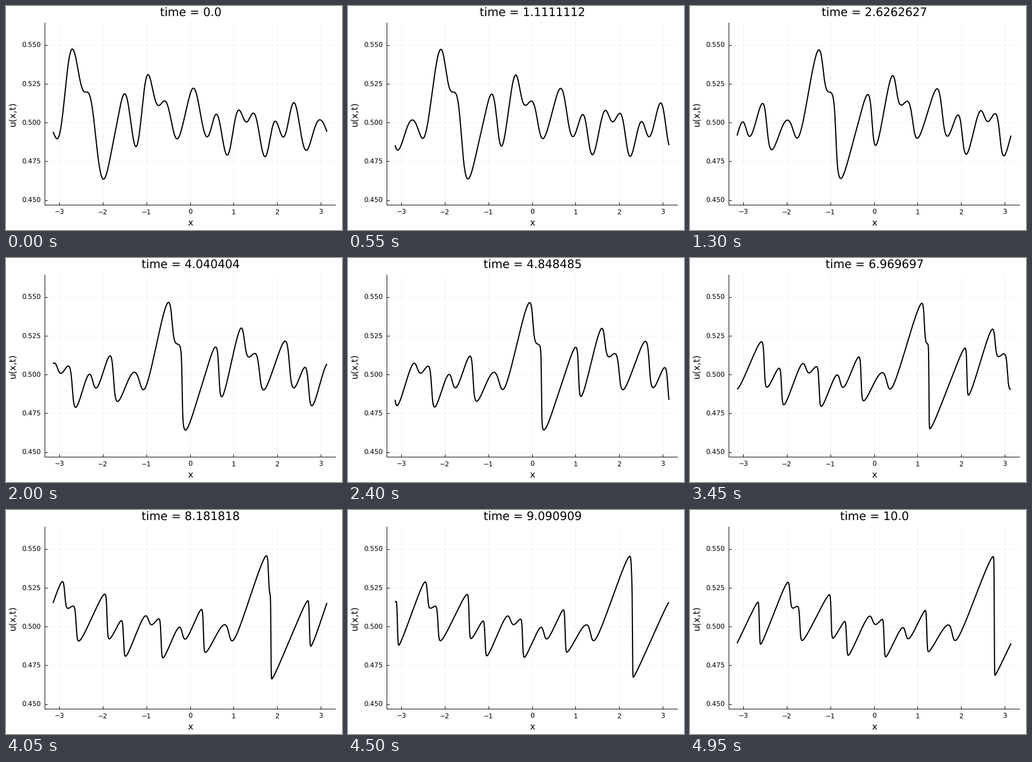
A matplotlib script for the animation above (5 s loop, 600x400 px).

```python
"""Viscous Burgers equation on a periodic domain, animated over ten time units."""
import numpy as np
import matplotlib.pyplot as plt
from matplotlib.animation import FuncAnimation

W, H, DPI = 600, 400, 100
FRAMES, INTERVAL = 100, 50
N, MODES, NU, SUBSTEPS = 2048, 24, 1e-4, 8
MEAN = 0.5

# Crests, troughs and one shoulder (x, u) of the initial wave
KEYS = np.array([
    (-3.05, .4896), (-2.70, .5475), (-2.37, .5197), (-1.985, .4635),
    (-1.50, .5186), (-1.24, .4845), (-.963, .5310), (-.72, .5110),
    (-.585, .5140), (-.297, .4895), (.078, .5222), (.392, .4908),
    (.604, .5054), (.853, .4790), (1.122, .5081), (1.29, .5004),
    (1.455, .5061), (1.72, .4780), (1.958, .5009), (2.14, .4907),
    (2.383, .5129), (2.667, .4821), (2.98, .5018)])


def basis(x, slope=False):
    """Fourier columns at x, or their derivatives."""
    k = np.arange(1, MODES + 1)
    a = np.outer(x, k)
    if slope:
        return np.hstack([np.zeros((len(x), 1)), -k * np.sin(a), k * np.cos(a)])
    return np.hstack([np.ones((len(x), 1)), np.cos(a), np.sin(a)])


def initial_wave(x):
    """Smoothest periodic curve that is level at every key point."""
    key_x, key_u = KEYS.T
    k = np.arange(1, MODES + 1)
    smooth = np.diag(2e-5 * np.concatenate([[0], k, k]) ** 3)
    rows = np.vstack([basis(key_x), 0.02 * basis(key_x, slope=True), smooth])
    rhs = np.zeros(len(rows))
    rhs[:len(key_u)] = key_u - MEAN
    return basis(x) @ np.linalg.lstsq(rows, rhs, rcond=None)[0]


def solve(v):
    """Integrating-factor RK4 in Fourier space for v = u - MEAN."""
    k = np.arange(N // 2 + 1)
    keep = k < N / 3
    dt = 10 / (FRAMES - 1) / SUBSTEPS
    half = np.exp((-1j * MEAN * k - NU * k ** 2) * dt / 2)
    full = half ** 2

    def advect(s):
        return -0.5j * k * keep * np.fft.rfft(np.fft.irfft(s, N) ** 2)

    s = np.fft.rfft(v)
    waves = [v]
    for _ in range(FRAMES - 1):
        for _ in range(SUBSTEPS):
            a = advect(s)
            b = advect(half * (s + dt / 2 * a))
            c = advect(half * s + dt / 2 * b)
            d = advect(full * s + dt * half * c)
            s = full * s + dt / 6 * (full * a + 2 * half * (b + c) + d)
        waves.append(np.fft.irfft(s, N))
    return [MEAN + np.append(w, w[0]) for w in waves]


grid = np.linspace(-np.pi, np.pi, N + 1)
waves = solve(initial_wave(grid[:-1]))

plt.rcParams.update({"font.family": "DejaVu Sans", "text.hinting": "none"})
fig = plt.figure(figsize=(W / DPI, H / DPI), dpi=DPI, facecolor="white")

LEFT, RIGHT, TOP, BOTTOM = 69.4, 588.2, 29.9, 355.4
X_SCALE, Y_SCALE = 77.83, 2768
X_ZERO, Y_MID = 328.6, 208.2


def pt(px):
    return px * 72 / DPI


def to_px(x, u):
    return X_ZERO + x * X_SCALE, Y_MID - (u - MEAN) * Y_SCALE


def label(px, py, text, size, ha="center", **kw):
    return fig.text(px / W, 1 - py / H, text, fontsize=pt(size), ha=ha,
                    va="baseline", color="black", **kw)


ax = fig.add_axes([LEFT / W, 1 - BOTTOM / H, (RIGHT - LEFT) / W, (BOTTOM - TOP) / H])
ax.set_xlim((LEFT - X_ZERO) / X_SCALE, (RIGHT - X_ZERO) / X_SCALE)
ax.set_ylim(MEAN + (Y_MID - BOTTOM) / Y_SCALE, MEAN + (Y_MID - TOP) / Y_SCALE)
ax.spines[["top", "right"]].set_visible(False)
ax.spines[["left", "bottom"]].set_linewidth(pt(1))

x_ticks = range(-3, 4)
u_ticks = np.linspace(0.45, 0.55, 5)
ax.set_xticks(x_ticks)
ax.set_yticks(u_ticks)
ax.tick_params(direction="in", length=pt(5), width=pt(1),
               labelbottom=False, labelleft=False)
ax.set_axisbelow(True)
ax.grid(color="black", alpha=0.055, linewidth=pt(1))

for x in x_ticks:
    label(to_px(x, 0)[0], 371.6, str(x).replace("-", "\u2212"), 11.85)
for u in u_ticks:
    label(62.4, to_px(0, u)[1] + 4.5, f"{u:.3f}", 11.85, ha="right")
label(X_ZERO + 0.3, 392, "x", 16.3)
label(16.4, 192.6, "u(x,t)", 16.3, rotation=90, rotation_mode="anchor")
title = label(329.6, 18.7, "", 20.7)

curve, = ax.plot([], [], color="black", linewidth=pt(2.1),
                 solid_joinstyle="round", solid_capstyle="butt")


def draw(i):
    time = np.float32(i / (FRAMES - 1)) * np.float32(10)
    curve.set_data(grid, waves[i])
    title.set_text(f"time = {str(time)}")
    return curve, title


anim = FuncAnimation(fig, draw, frames=FRAMES, interval=INTERVAL,
                     repeat=True, repeat_delay=0, blit=False)
plt.show()
```
